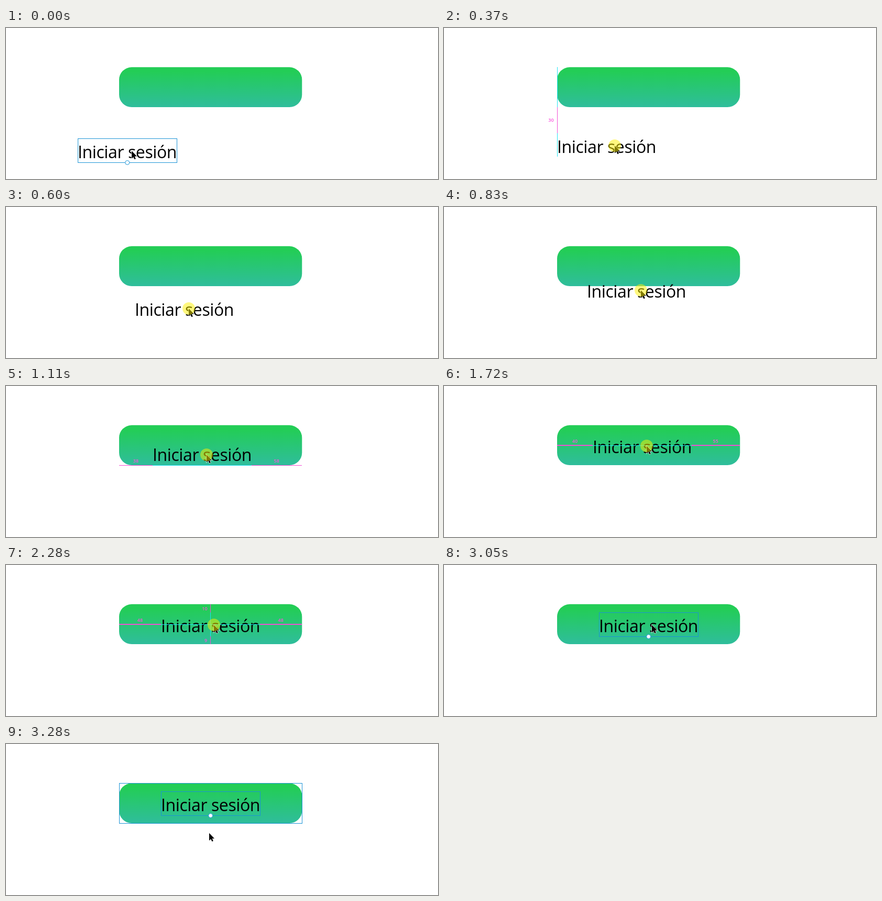
An HTML page for the animation above (3330 ms loop, 825 by 290 pixels).

```html
<!DOCTYPE html>
<html lang="es">
<head>
<meta charset="utf-8">
<title>Botón</title>
<style>
  html, body { margin: 0; width: 100%; height: 100%; overflow: hidden; background: #fff; }
  svg { display: block; }
  text { font-family: "Open Sans", "Noto Sans", sans-serif; }
  #label { font-size: 32px; letter-spacing: -0.4px; }
  #guides text { font-size: 9px; font-weight: 600; fill: #f955dc; text-anchor: middle; }
  .outline { fill: none; stroke: #1b93d6; }
</style>
</head>
<body>
<svg width="825" height="290" viewBox="0 0 825 290">
  <defs>
    <linearGradient id="green" x2="0" y2="1">
      <stop offset="0.1" stop-color="#23cd56"/>
      <stop offset="1" stop-color="#2fbd9c"/>
    </linearGradient>
  </defs>
  <rect x="216" y="75.3" width="349.3" height="76.8" rx="24" fill="url(#green)"/>
  <rect id="hover" class="outline" x="216.5" y="75.5" width="349" height="77"/>
  <text id="label">Iniciar sesión</text>
  <g id="select">
    <rect id="box" class="outline" width="189" height="46"/>
    <circle id="handle" r="4" fill="#fff" stroke="#1b93d6"/>
  </g>
  <g id="guides"></g>
  <path id="cursor" d="M0 0V14.5L3.3 11.4 5.4 16.3 7.8 15.3 5.7 10.6H10Z" stroke="#fff" stroke-width="1.2" paint-order="stroke"/>
  <circle id="press" r="12" fill="#fff100" fill-opacity="0.5"/>
</svg>
<script>
const LOOP = 3330, TICKS = 72, TICK = LOOP / TICKS;
const GRAB = 1, DROP = 66, HOVER = 70;
const W = 188.5, H = 46;
const BTN = { l: 216, t: 75, r: 565, b: 152 };
const PINK = '#f24fd4', CYAN = '#1ee4f5';
const $ = id => document.getElementById(id);

// cursor path: tick, x, y
const PATH = [
  [0, 240, 236], [GRAB, 240, 236], [8, 326, 226], [12, 344, 202], [18, 376, 160],
  [21, 381, 115], [24, 383, 132], [31, 386, 115], [37, 387, 115], [48, 392, 115],
  [49, 397, 115], [68, 397, 115], [71, 388, 171]
];

function cursorAt(tick) {
  const i = Math.max(1, PATH.findIndex(k => k[0] >= tick));
  const [t0, x0, y0] = PATH[i - 1], [t1, x1, y1] = PATH[i];
  const f = (tick - t0) / (t1 - t0);
  return [Math.round(x0 + (x1 - x0) * f), Math.round(y0 + (y1 - y0) * f)];
}

// the text follows the cursor and snaps to the button's edges and centre lines
function textAt(tick) {
  const [cx, cy] = cursorAt(Math.min(tick, DROP));
  const near = (v, to, reach) => Math.abs(v - to) <= reach;
  const x = cx - 103, y = cy - 24;
  const snap = {
    left: near(x, BTN.l, 7), center: near(x, 296, 3),
    bottom: near(y, BTN.b - H, 3), middle: near(y, 91, 3)
  };
  return {
    snap,
    x: snap.left ? BTN.l : snap.center ? 296 : x,
    y: snap.bottom ? BTN.b - H : snap.middle ? 91 : y
  };
}

const bar = (x, y, w, h, fill) =>
  `<rect x="${x}" y="${y}" width="${w}" height="${h}" fill="${fill}"/>`;
const note = (x, y, s) => `<text x="${x}" y="${y}">${s}</text>`;
const units = px => Math.floor(px / 1.66);

function across(x, y, h) {
  const r = x + W, top = y + 1 - h;
  return bar(BTN.l, top, x - BTN.l, h, PINK) + bar(r, top, BTN.r - r, h, PINK) +
    bar(x, y, W, 1, CYAN) +
    note((BTN.l + x) / 2, y - 5.5, units(x - BTN.l)) +
    note((r + BTN.r) / 2, y - 5.5, units(BTN.r - r));
}

function guides({ x, y, snap }) {
  let s = '';
  if (snap.left) {
    s += bar(x, BTN.t, 1, BTN.b - BTN.t, CYAN) + bar(x, BTN.b, 1, y - BTN.b, PINK) +
      bar(x, y, 1, H - 1, CYAN) + note(x - 11.5, (BTN.b + y) / 2 + 3, units(y - BTN.b));
  }
  if (snap.bottom) s += across(x, BTN.b, 1);
  if (snap.middle) s += across(x, 114, 2);
  if (snap.center) {
    s += bar(390, BTN.t, 1, y - BTN.t, PINK) + bar(390, y, 1, H, CYAN) +
      bar(390, y + H, 1, BTN.b - y - H, PINK) + note(379.5, 87, 10) + note(381.5, 148, 9);
  }
  return s;
}

const show = (id, yes) => { $(id).style.display = yes ? '' : 'none'; };
const set = (id, attrs) => { for (const k in attrs) $(id).setAttribute(k, attrs[k]); };
let last = -1;

function draw() {
  const tick = Math.floor((performance.now() % LOOP + 6) / TICK) % TICKS;
  if (tick !== last) {
    last = tick;
    const [cx, cy] = cursorAt(tick), text = textAt(tick), { x, y } = text;
    const drag = tick >= GRAB && tick < DROP;
    set('label', { x, y: y + 38 });
    set('cursor', { transform: `translate(${cx} ${cy})` });
    set('press', { cx, cy });
    set('box', { x: x + 0.5, y: y + 0.5 });
    set('handle', { cx: x + 94.7, cy: y + H + 0.5 });
    show('press', drag);
    show('select', !drag);
    show('hover', tick >= HOVER);
    $('guides').innerHTML = drag ? guides(text) : '';
  }
  requestAnimationFrame(draw);
}
draw();
</script>
</body>
</html>
```
